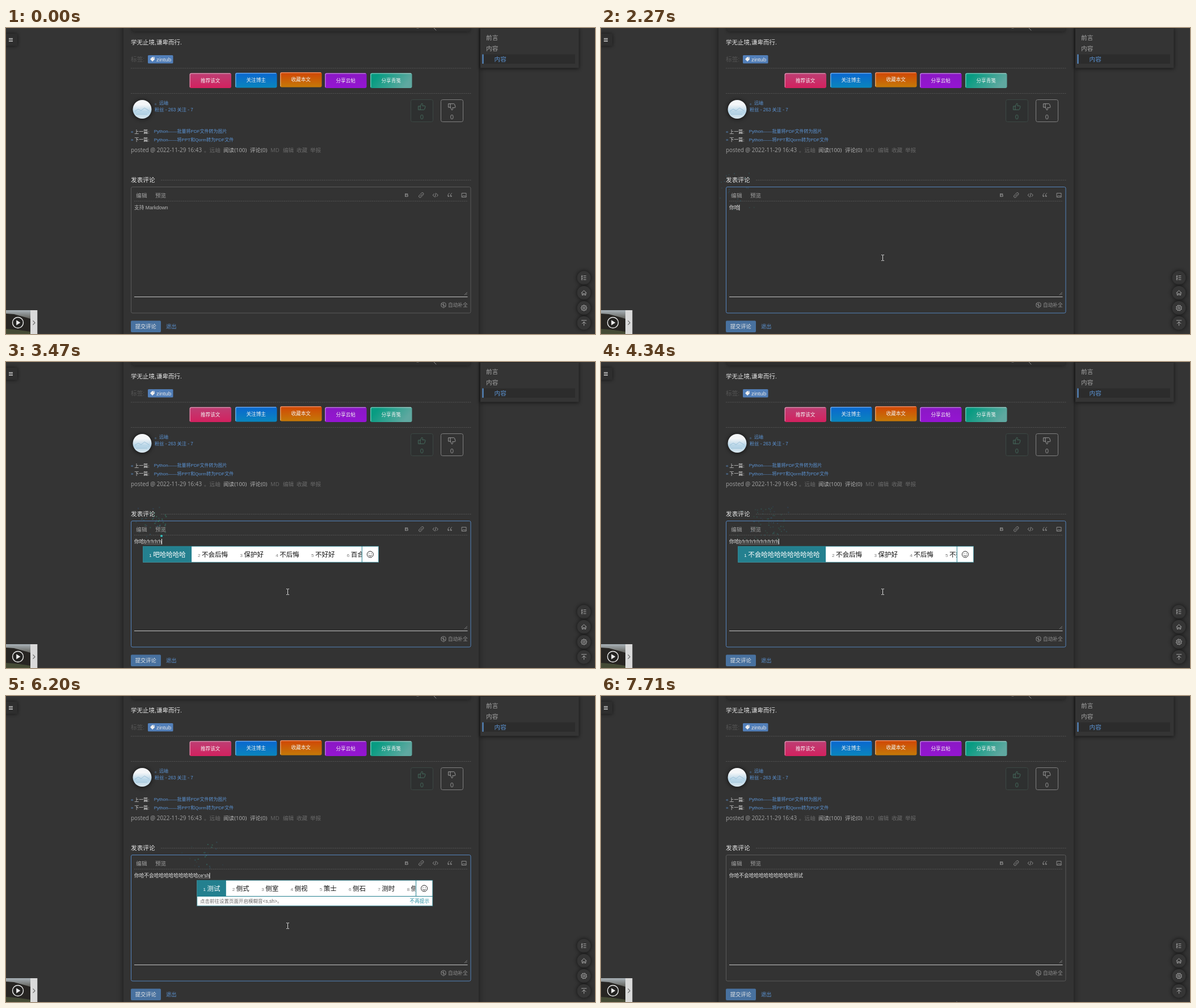
Recreate the animation shown at these times as an HTML page with a canvas. Size 1038x540 px, loop 7980 ms.

```html
<!DOCTYPE html>
<html lang="zh-CN">
<head>
<meta charset="utf-8">
<title>Comment box</title>
<style>
html, body { margin: 0; width: 100%; height: 100%; overflow: hidden; background: #343434; }
svg, canvas { display: block; }
#stage, #sparks { position: absolute; left: 0; top: 0; }
#sparks { pointer-events: none; }
text { font-family: "Liberation Sans", "Noto Sans CJK SC", "Noto Sans CJK", sans-serif; white-space: pre; }
.ui { font-family: "Open Sans", "Noto Sans CJK SC", "Noto Sans CJK", sans-serif; }
.h { font-size: 10.67px; }
.m { font-size: 9.6px; }
.s { font-size: 8.67px; }
.xs { font-size: 8px; }
.blue { fill: #5b93d3; }
.gray { fill: #a2a2a2; }
.dim { fill: #696969; }
.white { fill: #e6e6e6; }
.mid { text-anchor: middle; }
.dash { stroke: #5c5c5c; stroke-dasharray: 2 1.3; stroke-width: .8; }
.ico { fill: none; stroke: #8c8c8c; stroke-width: 1; stroke-linecap: round; stroke-linejoin: round; }
.btn text { font-size: 8.67px; fill: #f2f2f2; text-anchor: middle; }
.btn path { fill: none; stroke: #fff; stroke-opacity: .45; stroke-width: 1.3; }
</style>
</head>
<body>
<svg id="stage" width="1038" height="540" viewBox="0 0 1038 540">
  <defs>
    <filter id="soft" x="-30%" y="-30%" width="160%" height="160%"><feGaussianBlur stdDeviation="6"/></filter>
    <filter id="near" x="-40%" y="-40%" width="180%" height="180%"><feGaussianBlur stdDeviation="3"/></filter>
    <linearGradient id="pink" x2="0" y2="1"><stop stop-color="#bd3f74"/><stop offset="1" stop-color="#d3215f"/></linearGradient>
    <linearGradient id="azure" x2="0" y2="1"><stop stop-color="#0a66d0"/><stop offset="1" stop-color="#0a86bd"/></linearGradient>
    <linearGradient id="amber" x2="0" y2="1"><stop stop-color="#d14506"/><stop offset="1" stop-color="#c57a08"/></linearGradient>
    <linearGradient id="violet" x2="0" y2="1"><stop stop-color="#8a18c4"/><stop offset="1" stop-color="#9515d2"/></linearGradient>
    <linearGradient id="teal" x2="1" y2=".3"><stop offset=".2" stop-color="#089c82"/><stop offset="1" stop-color="#5fa8a0"/></linearGradient>
    <linearGradient id="sky" x2="0" y2="1"><stop offset=".25" stop-color="#f4f6f8"/><stop offset=".65" stop-color="#b4d3e6"/><stop offset="1" stop-color="#dbe8ef"/></linearGradient>
    <linearGradient id="film" x2="0" y2="1"><stop stop-color="#a9b2b8"/><stop offset=".3" stop-color="#6d6e6a"/></linearGradient>
    <path id="thumb" d="M-6-1h3v6.3h-3zM-3-.5L-.4-5.8c2 0 2.2 1.6 1.2 4.2h4.1c1 0 1.3.8 1 1.6l-1.3 4.4c-.2.6-.6.9-1.2.9H-3"/>
  </defs>

  <!-- page column -->
  <rect x="207" y="-20" width="626" height="580" opacity=".5" filter="url(#soft)"/>
  <rect x="207" width="626" height="540" fill="#333"/>
  <rect x="222" y="-20" width="596" height="27" rx="4" opacity=".4" filter="url(#near)"/>
  <rect x="222" y="-5" width="596" height="11" rx="4" fill="#2d2d2d"/>
  <path class="ico" d="M753-1l5 5M724 0h3"/>

  <text class="white" font-size="10.5" x="220" y="28.7">学无止境,谦卑而行.</text>
  <text class="h" fill="#555" x="220" y="59">标签:</text>
  <rect x="250" y="48" width="44.5" height="14.5" rx="1.5" fill="#527fb9"/>
  <path d="M254 55l3.6-3.8h4.2v4.2l-3.7 3.8z" fill="#eee"/><circle cx="260.3" cy="52.8" r=".8" fill="#527fb9"/>
  <text class="white" font-size="9.8" x="265" y="58.6">zintub</text>
  <path class="dash" d="M220 71H820M220 115.5H820M273 268.5H820"/>
  <g id="share"></g>

  <circle cx="240" cy="144" r="18" opacity=".5" filter="url(#near)"/>
  <circle cx="240" cy="143.5" r="16.5" fill="url(#sky)"/>
  <path d="M227 147l6-4 5 3 6-5 8 5M229 152h20" stroke="#8fb9d4" stroke-width=".8" fill="none"/>
  <text class="blue xs" x="262" y="135">。远岫</text>
  <text class="blue" font-size="8.2" x="262" y="147">粉丝 - 263 关注 - 7</text>
  <rect x="713.5" y="126.5" width="39" height="39" rx="3" fill="#2e3030" stroke="#3c4844"/>
  <rect x="766.5" y="126.5" width="39" height="39" rx="3" fill="none" stroke="#808080"/>
  <use href="#thumb" class="ico" style="stroke:#456b5d" x="733" y="139"/>
  <use href="#thumb" class="ico" style="stroke:#999" transform="translate(786 139) scale(1 -1)"/>
  <text class="mid ui" font-size="11" fill="#456b5d" x="733" y="161">0</text>
  <text class="mid ui" font-size="11" fill="#999" x="786" y="161">0</text>

  <g class="xs">
    <text class="blue" x="220" y="185.6">«</text><text class="white" font-weight="500" x="226.3" y="185.6">上一篇:</text>
    <text class="blue" x="260.7" y="185.4">Python——批量将PDF文件转为图片</text>
    <text class="blue" x="220" y="200.2">»</text><text class="white" font-weight="500" x="226.3" y="200.2">下一篇:</text>
    <text class="blue" x="260.7" y="200">Python——将PPT和Qorm转为PDF文件</text>
  </g>
  <g class="m">
    <text class="gray ui" font-size="9.9" style="font-size:9.9px" x="220" y="219">posted @ 2022-11-29 16:43</text>
    <text class="dim" x="349" y="219">。远岫</text>
    <text class="ui" fill="#b5b5b5" x="383" y="219">阅读(100)</text>
    <text class="ui" fill="#b5b5b5" x="430" y="219">评论(0)</text>
    <text class="dim ui" x="466" y="219">MD</text>
    <text class="dim" x="488" y="219">编辑</text>
    <text class="dim" x="512" y="219">收藏</text>
    <text class="dim" x="536" y="219">举报</text>
  </g>
  <text class="white h" x="220" y="272.3">发表评论</text>

  <!-- editor -->
  <rect id="frame" x="220.5" y="280.5" width="598.5" height="222.5" rx="2.5" fill="none" stroke="#5a5a5a"/>
  <text class="gray m" x="229.3" y="298.8">编辑</text><text class="gray m" x="263" y="298.8">预览</text>
  <path class="dash" d="M226 305.5H814"/>
  <text class="mid" font-size="9.5" font-weight="bold" fill="#8c8c8c" x="706" y="298.4">B</text>
  <g class="ico">
    <path d="M730.5 296.5l3-3M730.5 293l1.8-1.8a2 2 0 0 1 3 3l-1.7 1.8M733 296.8l-1.8 1.8a2 2 0 0 1-3-3l1.8-1.8"/>
    <path d="M754.5 292.5l-2.3 2.5 2.3 2.5M759 292.5l2.3 2.5-2.3 2.5M757.6 291.5l-1.6 7"/>
    <path d="M781 291.5q-2.5 1.5-2.3 5M785.5 291.5q-2.5 1.5-2.3 5" /><circle cx="779.8" cy="296.8" r=".9"/><circle cx="784.3" cy="296.8" r=".9"/>
    <path d="M803.5 291.5h7.5v7h-7.5zM804 297.5l2.2-2.2 1.6 1.4 1.3-1 1.6 1.6"/>
    <path d="M808 471l4.5-4.5M810.5 471l2-2" stroke-width=".8"/>
    <path d="M769.5 484.5l-2.5 1.7v5l2.5 1.7M772.5 484.5l2.5 1.7v5l-2.5 1.7M771 484v10M767.5 486.5l7 5"/>
  </g>
  <path d="M226 474.5H813.5" stroke="#c4c4c4"/>
  <text class="s" fill="#8f8f8f" x="779" y="492">自动补全</text>
  <rect x="220" y="516.5" width="53" height="20.5" rx="2" fill="#48719f"/>
  <text class="mid white" font-size="9.3" x="246.3" y="530.2">提交评论</text>
  <text class="blue" font-size="9.2" x="282" y="529.8">退出</text>

  <!-- corner widgets -->
  <rect x="-4" y="10" width="24" height="22" opacity=".55" filter="url(#near)"/>
  <rect y="10" width="20" height="21.5" fill="#2e2e2e"/>
  <path d="M5 18.5h7M5 21h7M5 23.5h7" stroke="#eee" stroke-width="1.2"/>
  <rect y="498" width="43" height="42" fill="url(#film)"/>
  <path d="M0 504l14 1 29 8v27H0z" fill="#272522"/><path d="M0 531q20 1 43 5v4H0z" fill="#454b35"/>
  <rect x="43" y="498" width="12.3" height="42" fill="#dadada"/>
  <path d="M47.5 516.5l3.5 3.7-3.5 3.7" fill="none" stroke="#666" stroke-width="1.1"/>
  <circle cx="21" cy="520" r="9.5" fill="#222" fill-opacity=".45" stroke="#eee" stroke-width="1.4"/>
  <path d="M18.2 515.5l7.2 4.5-7.2 4.5z" fill="#eee"/>

  <rect x="835" y="0" width="175" height="72" opacity=".55" filter="url(#near)"/>
  <rect x="836" y="1" width="173.5" height="69.5" fill="#343434"/>
  <rect x="840" y="46.5" width="163" height="16.5" fill="#2c2c2c"/>
  <rect x="839.5" y="46.5" width="2" height="16.5" fill="#5b93d3"/>
  <g class="h"><text class="gray" x="846" y="20.6">前言</text><text class="gray" x="846" y="39.6">内容</text><text class="blue" x="860.5" y="58.6">内容</text></g>

  <g id="dock"></g>
  <g class="ico" style="stroke:#a8a8a8">
    <path d="M1015 436.5v8.5M1018 437.5h4M1018 440.7h4M1018 444h4M1014 439l2-1M1014 443l2-1"/>
    <path d="M1014 467.5l4.5-4.3 4.5 4.3M1015.3 467v4.3h2v-2.6h2.4v2.6h2V467"/>
    <path d="M1014.3 516h8.6M1018.6 525v-6.5M1015.2 521.8l3.4-3.4 3.4 3.4"/>
    <g id="gear"><path id="teeth"/><circle r="1.8"/></g>
  </g>

  <text id="typed" class="s" x="226" y="320"></text>
  <path id="under" stroke="#aaa" stroke-width=".8" stroke-dasharray="1 .7"/>
  <rect id="caret" y="312" width="1" height="10" fill="#eee"/>
  <g id="ime"></g>
  <path id="beam" d="M-2.5-5h1.8l.7.6.7-.6h1.8M0-4.4v8.8M-2.5 5h1.8l.7-.6.7.6h1.8" fill="none" stroke="#ddd"/>
  <path id="arrow" d="M0 0v11l2.6-2.4 1.8 4 1.6-.7-1.8-3.9H8z" fill="#eee" stroke="#222" stroke-width=".5"/>
</svg>
<canvas id="sparks" width="1038" height="540"></canvas>
<script>
const LOOP = 7980, LEFT = 226;
const $ = id => document.getElementById(id);
const ctx = $('sparks').getContext('2d');

// static repeats
$('share').innerHTML = [
  [323.5, 79.5, 'pink', '推荐该文'], [404, 79, 'azure', '关注博主'], [483, 78, 'amber', '收藏本文'],
  [562, 79.5, 'violet', '分享云帖'], [642, 79.5, 'teal', '分享青笺']
].map(([x, y, fill, label]) => `<g class="btn" transform="translate(${x} ${y})">
  <rect width="73.5" height="26.5" rx="3" fill="url(#${fill})"/>
  <path d="M.8 25V3Q.8.8 3 .8H72"/><text x="36.7" y="16.3">${label}</text></g>`).join('');
$('dock').innerHTML = [440.7, 467.3, 494, 520.5].map(y =>
  `<circle cx="1018.5" cy="${y}" r="13" opacity=".5" filter="url(#near)"/>
   <circle cx="1018.5" cy="${y}" r="12" fill="#353535"/>`).join('');
$('teeth').setAttribute('d', 'M' + Array.from({ length: 48 }, (_, i) => {
  const a = i / 48 * Math.PI * 2, r = 4.5 + .55 * Math.cos(8 * a);
  return (r * Math.cos(a)).toFixed(2) + ' ' + (r * Math.sin(a)).toFixed(2);
}).join('L') + 'z');

// time, committed text, composition, candidates, hint row
const hi = '你好 你会 你还 你和 你很 拟合';
const tail = '不会后悔 保护好 不后悔 不好好 百合花';
const done = '你哈不会' + '哈'.repeat(9);
const keys = [
  [620, '', 'n', '你 那 年 能 呢 男'],
  [740, '', 'ni', hi],
  [1380, '', "ni'h", hi],
  [1470, '', "ni'ha", '你哈 你好 拟好 你 呢 尼'],
  [1600, '你哈', ''],
  [2750, '你哈', 'b', '不 吧 把 被 比 并'],
  ...[2880, 2960, 3040, 3450, 3500, 3540, 3580, 3620, 3660, 3700].map((t, i) => [
    t, '你哈', 'b' + "'h".repeat(i + 1),
    (i < 1 ? '不会' : (i < 4 ? '吧哈' : '不会') + '哈'.repeat(i < 4 ? i : i)) + ' ' + tail]),
  [4500, done, ''],
  [5050, done, 'c', '从 才 次 错 测 参 此'],
  [5200, done, 'ce', '测 侧 策 册 厕 恻 测试'],
  [5600, done, "ce's", '测试 策 测算 侧 测 色 册', true],
  [5700, done, "ce'sh", '测试 侧式 侧室 侧视 策士 侧石 测时 侧身', true],
  [6500, done + '测试', '']
];

function measure(s) {
  ctx.font = '8.67px "Liberation Sans", "Noto Sans CJK SC", "Noto Sans CJK", sans-serif';
  return ctx.measureText(s).width;
}

function imeMarkup(x, list, hint) {
  let at = 0, items = '';
  list.split(' ').forEach((word, i) => {
    const w = 28.3 + 11.5 * word.length, first = !i;
    if (first) items += `<rect width="${w}" height="28.5" fill="#24808f"/>`;
    items += `<text x="${at + 11}" y="18.8" font-size="8" fill="${first ? '#fff' : '#777'}">${i + 1}</text>
      <text x="${at + 18}" y="19.4" font-size="11.5" fill="${first ? '#fff' : '#111'}">${word}</text>`;
    at += w;
  });
  const w = Math.min(at, 386), h = hint ? 45.5 : 28.5;
  return `<g transform="translate(${x} 325)"><rect width="${w + 29.5}" height="${h}" fill="#fff"/>
    <svg width="${w}" height="28.5" overflow="hidden">${items}</svg>
    <path d="M${w} 0v28.5${hint ? `M0 28.5h${w + 29.5}` : ''}" stroke="#24808f"/>
    <rect x=".25" y=".25" width="${w + 29}" height="${h - .5}" fill="none" stroke="#24808f" stroke-width=".8"/>
    <g transform="translate(${w + 14.5} 14.5)" fill="none" stroke="#222"><circle r="5.5"/>
      <path d="M-3 1.2q3 3.4 6 0M-2-2.2v1.2M2-2.2v1.2"/></g>
    ${hint ? `<text x="5.5" y="40" font-size="8.5" fill="#666">点击前往设置页面开启模糊音&lt;s,sh&gt;。</text>
      <text x="375" y="40" class="s" fill="#2a93a6">不再提示</text>` : ''}</g>`;
}

const states = keys.map(([t, text, comp, list, hint]) => {
  const from = LEFT + measure(text), to = from + measure(comp);
  return { t, text: text + comp, from, to, comp, ime: list ? imeMarkup(from - 2, list, hint) : '' };
});
const idle = { text: '支持 Markdown', from: LEFT, to: LEFT, ime: '' };

const rand = n => { const v = Math.sin(n * 12.9898) * 43758.5453; return v - Math.floor(v); };

// each key throws sparks up from the caret; they fall back and fade
function drawSparks(t) {
  ctx.clearRect(0, 0, 1038, 540);
  states.forEach((s, k) => {
    const n = (t - s.t) * .06;
    if (n < 0 || n > 66) return;
    const count = 7 + Math.floor(rand(k + 5) * 6), hue = 155 + rand(k + 90) * 50;
    for (let i = 0; i < count; i++) {
      const id = k * 40 + i * 3 + 1;
      const vx = (rand(id) * 2 - 1) * .667, vy = -1 - rand(id + 1) * 1.33;
      ctx.globalAlpha = .96 ** n;
      ctx.fillStyle = `hsl(${hue + rand(id + 2) * 24 - 12} 55% 48%)`;
      ctx.fillRect(s.to + vx * n - 1, 309 + vy * n + .025 * n * n - 1, 2, 2);
    }
  });
  ctx.globalAlpha = 1;
}

const ease = (t, a, b) => {
  const p = Math.max(0, Math.min(1, (t - a) / (b - a)));
  return p * p * (3 - 2 * p);
};

function drawMouse(t) {
  const away = t < 3000 ? 1 - ease(t, 0, 400) : ease(t, 6700, 7250);
  const x = 496.5 + 130 * away, y = 405.5 + (t < 3000 ? 85 : 133) * away;
  const shown = t >= 70, text = y < 474;
  $('beam').style.display = shown && text ? '' : 'none';
  $('arrow').style.display = shown && !text ? '' : 'none';
  $(text ? 'beam' : 'arrow').setAttribute('transform', `translate(${x} ${y})`);
  $('frame').setAttribute('stroke', shown && y < 503 ? '#5585bd' : '#5a5a5a');
}

let current;
function showState(s) {
  if (s === current) return;
  current = s;
  $('typed').textContent = s.text;
  $('typed').setAttribute('fill', s === idle ? '#b8b8b8' : '#e4e4e4');
  $('under').setAttribute('d', s.comp ? `M${s.from} 321.5H${s.to}` : '');
  $('caret').setAttribute('x', s.to);
  $('ime').innerHTML = s.ime;
}

function frame(now) {
  const t = now % LOOP;
  showState(states.filter(s => s.t <= t).pop() || idle);
  const caretOn = (t >= 450 && t < 7000) || (t >= 7450 && t < 7710);
  $('caret').style.display = caretOn ? '' : 'none';
  $('gear').setAttribute('transform', `translate(1018.5 494) rotate(${Math.min(t, 7250) * .09})`);
  drawSparks(t);
  drawMouse(t);
}

const start = performance.now();
function tick() {
  frame(performance.now() - start);
  requestAnimationFrame(tick);
}
tick();
</script>
</body>
</html>
```
